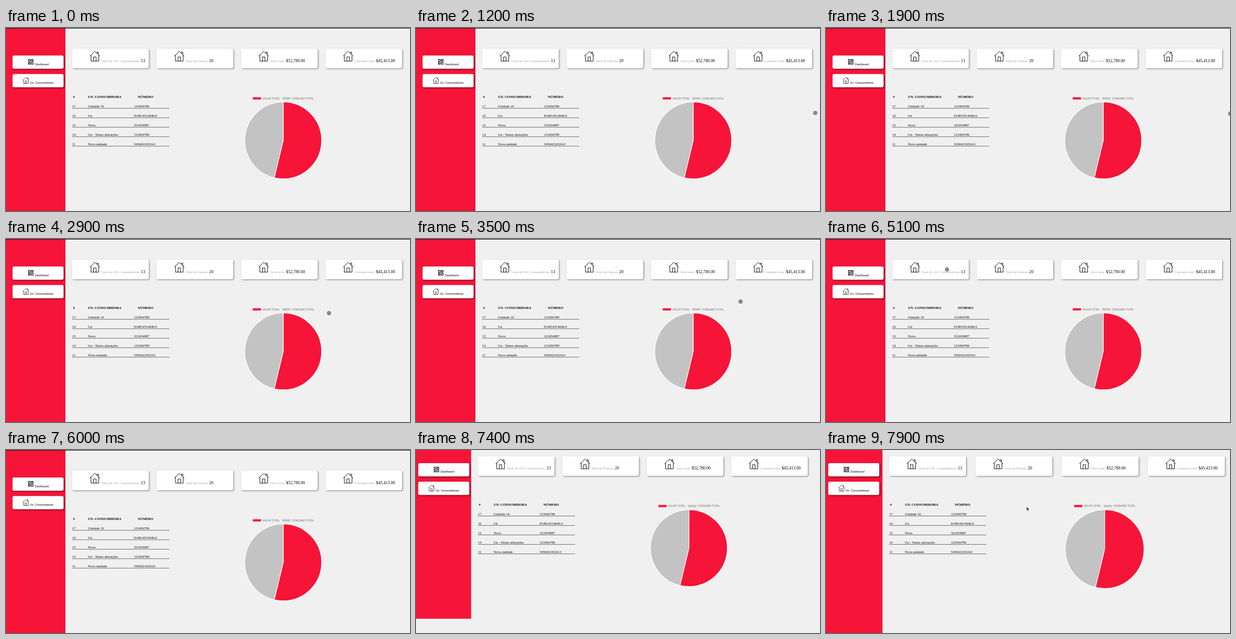
An HTML page with a canvas for the animation above (8000 ms loop, 768x348 px).

```html
<!DOCTYPE html>
<html lang="pt">
<head>
<meta charset="utf-8">
<title>Dashboard</title>
<style>
  html, body { margin: 0; width: 100%; height: 100%; overflow: hidden; background: #f0f0f0; }
  canvas { display: block; width: 768px; height: 348px; }
</style>
</head>
<body>
<canvas id="stage" width="768" height="348"></canvas>
<script>
const ctx = document.getElementById('stage').getContext('2d');
const LOOP = 8000, STEP = 100;
const UNFRAME = 7400, REFLOW = 7600, ARROW = 7800;
const RED = '#f61439', GRAY = '#c3c3c3', BG = '#f0f0f0';
const SERIF = '"Liberation Serif", serif', SANS = '"Liberation Sans", sans-serif';

const totalValue = 52780, totalUse = 45413;
const money = n => `$${n.toLocaleString('en-US')}.00`;
const cards = [
  ['Total de UD. Consumidoras:', '13'],
  ['Total de Faturas:', '20'],
  ['Valor total:', money(totalValue)],
  ['Consumo total:', money(totalUse)],
];
const rows = [
  ['17', 'Unidade 10', '123456789'],
  ['16', 'Un', '814814514646.0'],
  ['15', 'Nova', '321654987'],
  ['14', 'Un - Testes alterações', '123456789'],
  ['11', 'Nova unidade', '54564216524.0'],
];

const houseShape = new Path2D('M.5 10L10 .8L19.5 10M2.7 8V19.5H17.3V8M7.5 19.5V11.5H12.2V19.5M14 4.4V2.4H16.6V7');
const arrowShape = new Path2D('M0 0V6.3L1.4 5L2.4 7.2L3.4 6.7L2.5 4.7L4.4 4.5Z');

// Pointer stops: time, x, y.
const stops = [
  [300, 233, 104], [600, 475, 141], [900, 744, 159], [1200, 759, 161.5], [2400, 775, 164],
  [2700, 764, 236], [2900, 614, 141], [3500, 617, 119], [3800, 737, 80], [4100, 649, 58],
  [4400, 621, 89], [4700, 621, 89], [4900, 430, 51], [5100, 230, 58], [5500, 45, 199], [6000, 38, 354],
];

function pointerAt(t) {
  const i = stops.findIndex(stop => stop[0] > t);
  if (i < 1) return null;
  const [t0, x0, y0] = stops[i - 1], [t1, x1, y1] = stops[i];
  const k = (t - t0) / (t1 - t0);
  return [x0 + (x1 - x0) * k, y0 + (y1 - y0) * k];
}

function text(str, x, y, size, { color = '#000', family = SERIF, weight = '' } = {}) {
  ctx.font = `${weight} ${size}px ${family}`;
  ctx.fillStyle = color;
  ctx.fillText(str, x, y);
  return ctx.measureText(str).width;
}

function rect(x, y, w, h, color) {
  ctx.fillStyle = color;
  ctx.fillRect(x, y, w, h);
}

function panel(x, y, w, h, darkness) {
  ctx.save();
  ctx.shadowColor = `rgba(0,0,0,${darkness})`;
  ctx.shadowBlur = 3;
  ctx.shadowOffsetX = ctx.shadowOffsetY = 1.3;
  ctx.fillStyle = '#fff';
  ctx.beginPath();
  ctx.roundRect(x, y, w, h, 3);
  ctx.fill();
  ctx.restore();
}

function house(x, y, scale, width) {
  ctx.save();
  ctx.translate(x, y);
  ctx.scale(scale, scale);
  ctx.lineWidth = width / scale;
  ctx.strokeStyle = '#111';
  ctx.lineJoin = 'round';
  ctx.stroke(houseShape);
  ctx.restore();
}

function dashboardIcon(x, y) {
  const tall = 4.3, low = 2.6, full = 9;
  ctx.strokeStyle = '#111';
  ctx.lineWidth = 1.2;
  [[tall, low], [low, tall]].forEach(([upper, lower], col) => {
    const left = x + .6 + col * 5.6;
    ctx.strokeRect(left, y + .6, 3.3, upper);
    ctx.strokeRect(left, y + .6 + full - lower, 3.3, lower);
  });
}

function sidebar(grow) {
  const label = { family: SANS };
  rect(0, 0, 113 + 2.6 * grow, 348 + 28 * grow, RED);
  for (const y of [52.2, 87.5]) panel(12.5, y, 97, 25.2, .6);
  dashboardIcon(42, 59.2);
  text('Dashboard', 54.9, 70.6, 5.42, label);
  house(31.6, 93.4, .62, .7);
  text('Un. Consumidoras', 45.5, 106, 5.42, label);
}

function summary(left, grow) {
  cards.forEach(([label, value], i) => {
    const x = left + i * (160.5 + 3.5 * grow), y = 39.3;
    panel(x, y, 145.5 + .5 * grow, 37.2, .42);
    house(x + 33, y + 4.2, 1, 1);
    const w = text(label, x + 54.9, y + 25.3, 6.45, { color: '#a5a5a5' });
    text(value, x + 56.5 + w, y + 25.3, 8);
  });
}

function table(left) {
  const bold = { weight: 'bold' };
  text('#', left + 1.6, 133.1, 6.5, bold);
  text('UN. CONSUMIDORA', left + 30, 133.1, 6.5, bold);
  text('NÚMERO', left + 124.5, 133.1, 6.5, bold);
  rows.forEach(([id, name, number], i) => {
    const y = 151 + i * 18;
    text(id, left, y, 6.5);
    text(name, left + 29.8, y, 6.5);
    text(number, left + 117.2, y, 6.5);
    rect(left - .2, y + 1.4, 184.6, .75, '#444');
  });
}

function legend(x, label, color) {
  rect(x, 131.7, 15.6, 4.2, color);
  text(label, x + 18.4, 135.6, 4.88, { color: '#666', family: SANS });
}

function chart(grow) {
  const r = 73 + 1.8 * grow, cx = 527 + 10.9 * grow, cy = 140.8 + r;
  const top = -Math.PI / 2, end = top + 2 * Math.PI;
  const split = top + 2 * Math.PI * totalValue / (totalValue + totalUse);
  const slice = (from, to, color) => {
    ctx.beginPath();
    ctx.moveTo(cx, cy);
    ctx.arc(cx, cy, r, from, to);
    ctx.closePath();
    ctx.fillStyle = color;
    ctx.fill();
    ctx.stroke();
  };
  legend(cx - 57.9, 'VALOR TOTAL', RED);
  legend(cx - 1.9, 'CONSUMO TOTAL', GRAY);
  ctx.strokeStyle = '#fff';
  ctx.lineWidth = 1.1;
  slice(top, split, RED);
  slice(split, end, GRAY);
}

// grow is 1 once the page has reflowed to the wider window.
function page(grow) {
  const left = 126 + 2.4 * grow;
  sidebar(grow);
  summary(left, grow);
  table(left);
  chart(grow);
}

function dot([x, y]) {
  ctx.fillStyle = 'rgba(118,118,118,.85)';
  ctx.beginPath();
  ctx.arc(x, y, 4, 0, 2 * Math.PI);
  ctx.fill();
}

function arrow(x, y) {
  ctx.save();
  ctx.translate(x, y);
  ctx.strokeStyle = '#fff';
  ctx.lineWidth = .8;
  ctx.stroke(arrowShape);
  ctx.fillStyle = '#222';
  ctx.fill(arrowShape);
  ctx.restore();
}

function draw(t) {
  const framed = t < UNFRAME;
  rect(0, 0, 768, 348, BG);
  ctx.save();
  if (!framed) ctx.translate(-8.2, -27.2);
  page(t < REFLOW ? 0 : 1);
  ctx.restore();
  if (framed) rect(0, 0, 768, 1, '#1c1c1c');
  const pointer = pointerAt(t);
  if (pointer) dot(pointer);
  if (t >= ARROW) arrow(381.6, 108.5);
}

const origin = performance.now();
function frame() {
  const t = (performance.now() - origin) % LOOP;
  draw(Math.floor(t / STEP) * STEP);
  requestAnimationFrame(frame);
}
frame();
</script>
</body>
</html>
```
